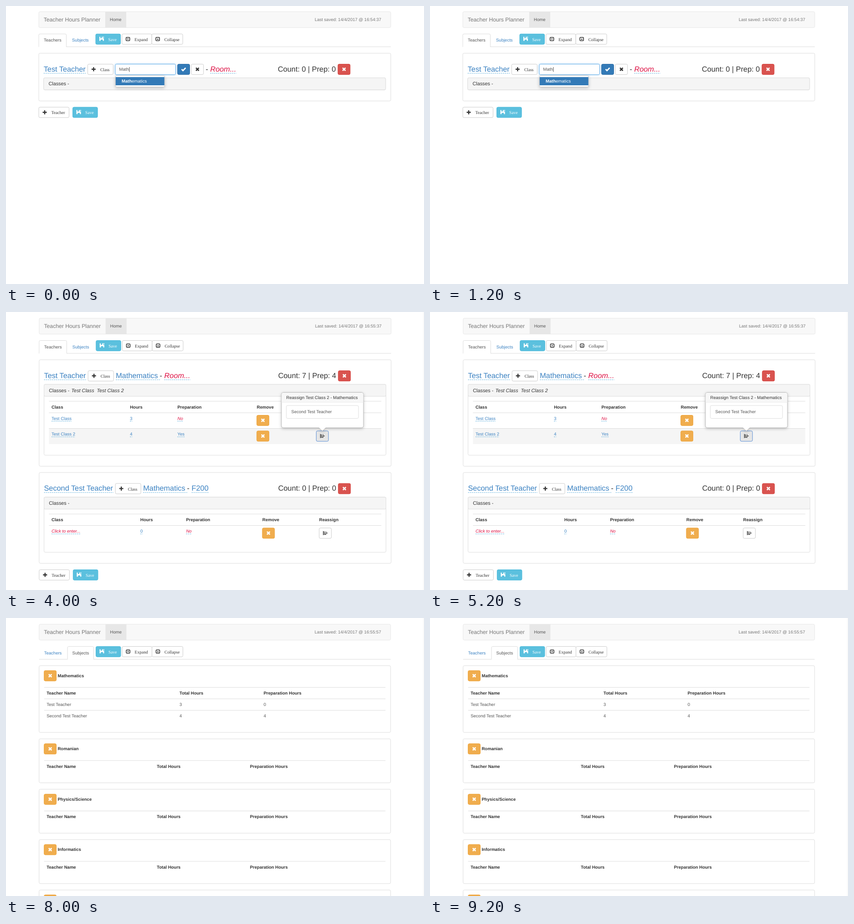
An HTML page for the animation above (10000 ms loop, 918 by 610 pixels).

```html
<!DOCTYPE html>
<html lang="en">
<head>
<meta charset="utf-8">
<title>Teacher Hours Planner</title>
<style>
html, body { margin: 0; width: 100%; height: 100%; overflow: hidden; background: #fff; }
svg { display: block; width: 918px; height: 610px; }
text { font-family: "Liberation Sans", Arial, sans-serif; white-space: pre; text-rendering: geometricPrecision; }
.serif { font-family: "Liberation Serif", Times, serif; }
.bold { font-weight: bold; }
.italic { font-style: italic; }
.shadow { filter: drop-shadow(0 2px 3px rgba(0, 0, 0, .22)); }
.glow { filter: drop-shadow(0 0 2px rgba(102, 175, 233, .6)); }
.scene { visibility: hidden; animation: show 10s step-end infinite; }
@keyframes show {
  0% { visibility: visible; }
  20%, 100% { visibility: hidden; }
}
</style>
</head>
<body>
<svg id="stage" viewBox="0 0 918 610"></svg>
<script>
const LINK = '#3b82c2', RED = '#d14', DARK = '#333', GREY = '#555', EDGE = '#ddd', HOVER = '#f5f5f5';
const SMALL = 9.55, MID = 10.85, BIG = 16.3;
const FILLS = {
  white: ['#fff', '#ccc', DARK],
  info: ['#5bc0de', '#46b8da', '#fff'],
  primary: ['#337ab7', '#2e6da4', '#fff'],
  warning: ['#f0ad4e', '#eea236', '#fff'],
  danger: ['#d9534f', '#d43f3a', '#fff'],
  active: ['#e6e6e6', '#5b8fd6', DARK]
};
const pen = document.createElement('canvas').getContext('2d');

function measure(str, size, cls) {
  pen.font = `${cls} ${size}px "Liberation Sans", Arial, sans-serif`;
  return pen.measureText(str).width;
}

// Text is placed by the vertical middle of its capitals.
const text = (x, mid, str, size = SMALL, fill = DARK, cls = '', anchor = 'start') =>
  `<text x="${x}" y="${mid + size * .345}" font-size="${size}" fill="${fill}" class="${cls}" text-anchor="${anchor}">${str}</text>`;

const box = (x, y, w, h, fill = '#fff', stroke = EDGE, r = 2.7, cls = '') =>
  `<rect x="${x}" y="${y}" width="${w}" height="${h}" rx="${r}" fill="${fill}" stroke="${stroke}" class="${cls}"/>`;

const fillBox = (x, y, w, h, fill) => box(x, y, w, h, fill, 'none', 0);

const rule = (x1, x2, y, color = EDGE, dash = 'none') =>
  `<path d="M${x1} ${y}H${x2}" stroke="${color}" stroke-dasharray="${dash}"/>`;

function link(x, mid, str, size = SMALL, color = LINK) {
  const cls = color === RED ? 'italic' : '';
  const drop = size === BIG ? 9.3 : 6;
  return text(x, mid, str, size, color, cls) +
    `<g stroke-width=".8">${rule(x, x + measure(str, size, cls), mid + drop, '#3d9fd6', '2.7 1.6')}</g>`;
}

const ICONS = {
  plus: c => `<path d="M-4.5 0H4.5M0-4.5V4.5" stroke="${c}" stroke-width="2.4"/>`,
  cross: c => `<path d="M-3.2-3.2L3.2 3.2M3.2-3.2L-3.2 3.2" stroke="${c}" stroke-width="2.7"/>`,
  check: c => `<path d="M-4.4 0L-1.4 3L4.4-3" fill="none" stroke="${c}" stroke-width="2.7"/>`,
  save: c => `<path d="M-5-5h2.3v3.2h3v-3.2h2.2v3.2h2.5v5.8h-2.3v-2.8h-5v2.8h-2.7zM3.2-5h2v2h-2z" fill="${c}"/>`,
  expand: c => frame(c) + `<path d="M-2-1H2L0 1.8z" fill="${c}"/>`,
  collapse: c => frame(c) + `<path d="M-2 1.4H2L0-1.4z" fill="${c}"/>`,
  move: c => `<path d="M-4.5-4.5V4.5M1.5-4V4" stroke="${c}"/><path d="M-4-2.6h3M-4 .2h4M-4 3h5M2 0h3" stroke="${c}" stroke-width="1.5"/>`
};
const frame = c => `<rect x="-4" y="-3.7" width="8" height="7.4" rx="1.5" fill="none" stroke="${c}" stroke-width="1.6"/>`;
const icon = (name, x, y, color) => `<g transform="translate(${x} ${y})">${ICONS[name](color)}</g>`;

function button(x, y, w, kind, glyph, label = '', labelX = 27.5) {
  const [fill, stroke, ink] = FILLS[kind];
  const iconX = label ? 13 : w / 2;
  return box(x, y, w, 22.8, fill, stroke) + icon(glyph, x + iconX, y + 11.2, ink) +
    text(x + labelX, y + 12.2, label, SMALL, ink, 'serif');
}
const saveButton = (x, y) => button(x, y, 54.5, 'info', 'save', 'Save');
const smallButton = (x, y, kind, glyph) => button(x, y, 26.8, kind, glyph);

function header(time, onSubjects) {
  const tab = onSubjects ? [134.5, 57.5] : [72, 60.5];
  const [x, w] = tab;
  return box(72, 12.5, 773, 34.8, '#f8f8f8', '#e7e7e7') +
    fillBox(218, 13, 46, 34, '#e7e7e7') +
    text(82.7, 30, 'Teacher Hours Planner', 12.2, '#777') +
    text(228, 30, 'Home', SMALL, GREY) +
    text(824, 30, `Last saved: 14/4/2017 @ ${time}`, SMALL, '#777', '', 'end') +
    rule(72, 845, 89.5) +
    `<path d="M${x} 90V64q0-2.7 2.7-2.7h${w - 5.4}q2.7 0 2.7 2.7V90" fill="#fff" stroke="${EDGE}"/>` +
    fillBox(x + .5, 88.5, w - 1, 2, '#fff') +
    text(83, 75.2, 'Teachers', SMALL, onSubjects ? LINK : GREY) +
    text(145, 75.2, 'Subjects', SMALL, onSubjects ? GREY : LINK) +
    saveButton(197, 61.3) +
    button(254.7, 61.3, 65.5, 'white', 'expand', 'Expand') +
    button(320.2, 61.3, 68, 'white', 'collapse', 'Collapse');
}

const footer = y => button(72, y, 66.5, 'white', 'plus', 'Teacher') + saveButton(146.6, y);

const room = (x, mid, name) =>
  text(x, mid, '-', BIG) + link(x + 10, mid, name, BIG, name === 'Room...' ? RED : LINK);

// One teacher panel; rows hold [class, hours, preparation].
function teacher(top, o) {
  const mid = top + 34.6, n = o.rows.length;
  const body = n ? 140.6 + 34.4 * n : 80.6;
  const shift = o.shift || 0;
  let s = box(72, top, 773, body + 24.2) +
    link(82.7, mid, o.name, BIG) +
    button(179.4 + shift, top + 24, 56, 'white', 'plus', 'Class') +
    text(597, mid, `Count: ${o.count} | Prep: ${o.prep}`, BIG) +
    smallButton(729, top + 24, 'danger', 'cross') +
    box(82.7, top + 54, 751, body - 54) +
    box(82.7, top + 54, 751, 26.3, HOVER) +
    text(93.4, top + 67, 'Classes -', MID);
  (o.tags || []).forEach(([x, label]) => s += text(x, top + 67, label, MID, DARK, 'italic'));
  s += o.editing ? o.editing(mid) :
    link(240.5 + shift, mid, 'Mathematics ', BIG) + room(336.8 + shift, mid, o.room);
  if (!n) return s;

  const cols = o.cols;
  const hover = o.hover;
  if (hover === 0) s += fillBox(93.5, top + 91, 730, 25.5, HOVER);
  if (hover > 0) s += fillBox(93.5, top + 116.2 + 34.4 * (hover - 1), 730, 34.4, HOVER);
  s += rule(93.5, 823.5, top + 91);
  ['Class', 'Hours', 'Preparation', 'Remove', 'Reassign'].forEach((label, i) =>
    s += text(cols[i], top + 103.6, label, SMALL, DARK, 'bold'));
  o.rows.forEach((row, i) => {
    const y = top + 116.3 + 34.4 * i;
    s += rule(93.5, 823.5, y);
    row.forEach((cell, j) => {
      const empty = cell === 'No' || cell.startsWith('Click');
      s += link(cols[j], y + 12.4, cell, SMALL, empty ? RED : LINK);
    });
    s += smallButton(cols[3], y + 5.4, 'warning', 'cross') +
      smallButton(cols[4], y + 5.4, hover === i + 1 ? 'active' : 'white', 'move');
  });
  return s;
}

const editor = mid =>
  box(240, 127.6, 132.5, 23, '#fff', '#66afe9', 2.7, 'glow') +
  text(248.5, mid + 1, 'Math', SMALL, GREY) +
  fillBox(270.5, 134, .9, 10.5, DARK) +
  smallButton(376.7, 127.6, 'primary', 'check') +
  smallButton(407, 127.6, 'white', 'cross') +
  room(438.5, mid, 'Room...');

const suggestions = () =>
  box(240.3, 152.8, 108, 24.6, '#fff', '#ccc', 2.7, 'shadow') +
  fillBox(240.8, 156, 107, 18, '#337ab7') +
  text(254, 165, '<tspan class="bold">Math</tspan>ematics', SMALL, '#fff');

const popover = () =>
  `<path class="shadow" d="M608.2 175.3H780.2q4 0 4 4V248.7q0 4-4 4H701.5L694 260L686.5 252.7H608.2q-4 0-4-4V179.3q0-4 4-4z" fill="#fff" stroke="#bbb"/>` +
  `<path d="M604.7 196.7V179.5q0-3.7 3.7-3.7H780q3.7 0 3.7 3.7V196.7z" fill="#f7f7f7"/>` +
  rule(604.7, 783.7, 197, '#ebebeb') +
  text(614.8, 186.3, 'Reassign Test Class 2 - Mathematics') +
  box(614.8, 204, 158.5, 28.3) +
  text(625.8, 217.8, 'Second Test Teacher', SMALL, GREY);

function subject(top, name, cols, rows = []) {
  let s = box(72, top, 773, rows.length ? 146.6 : 96.6) +
    smallButton(83, top + 10.7, 'warning', 'cross') +
    text(112.8, top + 21.7, name, SMALL, DARK, 'bold') +
    rule(83, 833.7, top + 47.7);
  ['Teacher Name', 'Total Hours', 'Preparation Hours'].forEach((label, i) =>
    s += text(cols[i], top + 60.3, label, SMALL, DARK, 'bold'));
  rows.forEach((row, r) => {
    const y = top + 72.8 + 25.2 * r;
    s += rule(83, 833.7, y);
    row.forEach((cell, i) => s += text(cols[i], y + 12.5, cell, SMALL, GREY));
  });
  return s;
}

const TOP = 103.6;
const first = ['Test Class', '3', 'No'], second = ['Test Class 2', '4', 'Yes'], blank = ['Click to enter...', '0', 'No'];
const test = { name: 'Test Teacher', room: 'Room...' };
const busy = {
  ...test, count: 7, prep: 4, rows: [first, second],
  cols: [99.2, 271.4, 375.7, 550, 680.6],
  tags: [[142.7, 'Test Class'], [198.6, 'Test Class 2']]
};
const other = {
  name: 'Second Test Teacher', room: 'F200', shift: 60,
  cols: [99.2, 294.2, 394.6, 562.2, 687]
};
const wide = [88.5, 330.8, 535.6];

const scenes = [
  [0, 0, 1, header('16:54:37') +
    teacher(TOP, { ...test, count: 0, prep: 0, rows: [], editing: editor }) +
    suggestions() + footer(222)],
  [77, 16.5, .9885, header('16:55:17') + teacher(TOP, busy) + footer(351.2)],
  [.8, 1.2, 1, header('16:55:37') +
    teacher(TOP, { ...busy, hover: 2 }) +
    teacher(351, { ...other, count: 0, prep: 0, rows: [blank] }) +
    popover() + footer(564.3)],
  [72.7, 13.2, .9987, header('16:55:47') +
    teacher(TOP, {
      ...test, count: 3, prep: 0, rows: [first], hover: 0,
      cols: [99.2, 254.1, 362.2, 541.8, 676], tags: [[142.7, 'Test Class']]
    }) +
    teacher(316.8, { ...other, count: 4, prep: 4, rows: [blank, second], tags: [[145.5, 'Test Class 2']] }) +
    footer(564.3)],
  [72.7, 13.2, .9987, header('16:55:57', true) +
    subject(TOP, 'Mathematics', [88.5, 380.8, 565.6],
      [['Test Teacher', '3', '0'], ['Second Test Teacher', '4', '4']]) +
    ['Romanian', 'Physics/Science', 'Informatics', 'Chemistry'].map((name, i) =>
      subject(264.3 + 110.7 * i, name, wide)).join('')]
];

document.getElementById('stage').innerHTML = scenes.map(([x, y, k, art], i) => {
  const origin = k === 1 ? '' : ' translate(-72 -12)';
  const edge = i > 1 ? fillBox(916, 0, 1, 610, '#f3f3f3') : '';
  return `<g class="scene" style="animation-delay:${i ? i * 2 - 10 : 0}s">${edge}` +
    `<g transform="translate(${x} ${y}) scale(${k})${origin}">${art}</g></g>`;
}).join('');
</script>
</body>
</html>
```
